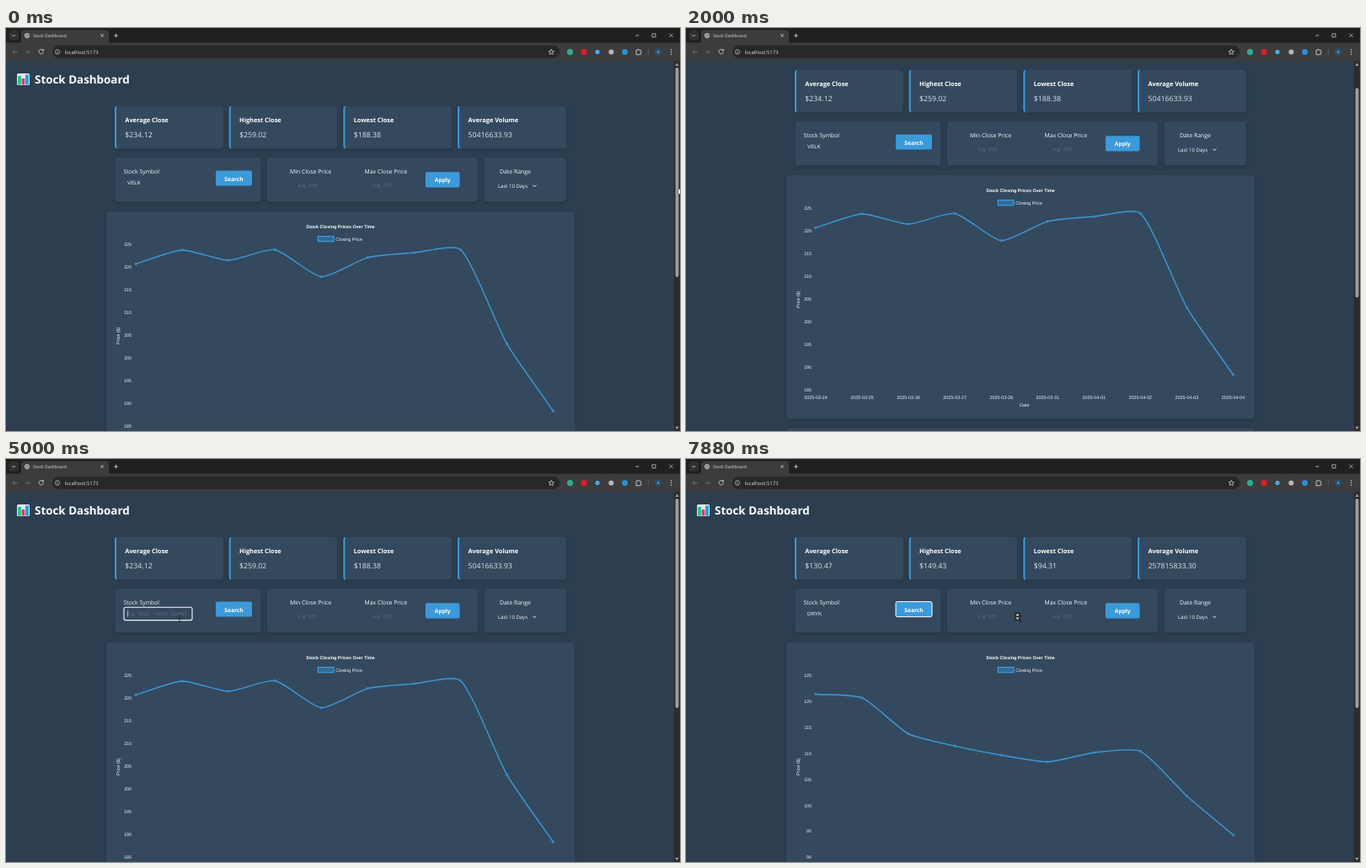
Animation, 800 px wide and 479 px high, one loop 8000 ms. Source, as an HTML page:

```html
<!DOCTYPE html>
<html lang="en">
<head>
<meta charset="utf-8">
<title>Stock Dashboard</title>
<style>
html, body { margin: 0; width: 100%; height: 100%; overflow: hidden; background: #2c3e50; }
svg { display: block; width: 100vw; height: 100vh; }
text { font-family: "Open Sans", "Noto Sans", sans-serif; text-rendering: geometricPrecision; white-space: pre; }
.plain { font-family: "Liberation Sans", Arial, sans-serif; }
.card { fill: #34495e; filter: drop-shadow(0 1px 1.5px rgba(0, 0, 0, .22)); }
</style>
</head>
<body>
<svg id="stage" viewBox="0 0 800 479" preserveAspectRatio="none"></svg>
<script>
const LOOP = 8000, STEP = 125;
const BLUE = '#3b9ad9', WHITE = '#f4f6f8', DIM = '#5d6e7e';
const stage = document.getElementById('stage');

function el(tag, attrs, parent, content) {
  const node = document.createElementNS('http://www.w3.org/2000/svg', tag);
  for (const key in attrs) node.setAttribute(key, attrs[key]);
  if (content !== undefined) node.textContent = content;
  parent.append(node);
  return node;
}
const group = (parent, attrs = {}) => el('g', attrs, parent);
const rect = (parent, x, y, width, height, attrs = {}) => el('rect', { x, y, width, height, ...attrs }, parent);
const circle = (parent, cx, cy, r, attrs) => el('circle', { cx, cy, r, ...attrs }, parent);
const line = (parent, d, attrs = {}) =>
  el('path', { d, fill: 'none', stroke: '#ddd', 'stroke-width': .8, ...attrs }, parent);
// cy is the middle of the capital letters
const text = (parent, x, cy, str, size, attrs = {}) =>
  el('text', { x, y: cy + size * .36, 'font-size': size, fill: WHITE, ...attrs }, parent, str);
const plain = (parent, x, cy, str, size, attrs) => text(parent, x, cy, str, size, { class: 'plain', ...attrs });
const middle = { 'text-anchor': 'middle' };
const show = (node, on) => node.setAttribute('visibility', on ? 'visible' : 'hidden');

const days = ['03-24', '03-25', '03-26', '03-27', '03-28', '03-31', '04-01', '04-02', '04-03', '04-04'].map(d => '2025-' + d);
const stocks = [
  { stats: ['$234.12', '$259.02', '$188.38', '50416633.93'], top: 225, ticks: 9,
    close: [220.73, 223.75, 221.53, 223.85, 217.9, 222.13, 223.19, 223.89, 203.19, 188.38] },
  { stats: ['$130.47', '$149.43', '$94.31', '257815833.30'], top: 125, ticks: 8,
    close: [121.41, 120.69, 113.76, 111.43, 109.67, 108.38, 110.15, 110.42, 101.8, 94.31] }
];
const AXIS = { left: 154, step: 55.05, top: 257.3, bottom: 473.4 };
const tickGap = s => (AXIS.bottom - AXIS.top) / (s.ticks - 1);
for (const s of stocks) s.ys = s.close.map(v => AXIS.top + (s.top - v) / 5 * tickGap(s));

/* ---------- page ---------- */
rect(stage, 0, 0, 800, 479, { fill: '#2c3e50' });
const page = group(stage);

rect(page, 13, 54, 15, 14, { rx: 1.5, fill: '#dfe9ef' });
rect(page, 14, 57, 4, 10.5, { fill: '#22c58b' });
rect(page, 18.7, 60, 3.6, 7.5, { fill: '#e8336d' });
rect(page, 23, 55.5, 4, 12, { fill: '#2b9fd8' });
text(page, 34, 61.3, 'Stock Dashboard', 13.4, { 'font-weight': 700, fill: '#fff' });

const card = (x, y, w, h) => rect(page, x, y, w, h, { rx: 4, class: 'card' });
const statValues = ['Average Close', 'Highest Close', 'Lowest Close', 'Average Volume'].map((label, i) => {
  const x = 129 + i * 135.7;
  card(x, 92.7, 128.8, 50.8);
  line(page, `M${x + 3} 92.7Q${x} 92.7 ${x} 96V140Q${x} 143.5 ${x + 3} 143.5Q${x + 2} 143 ${x + 2} 140V96Q${x + 2} 93.3 ${x + 3} 92.7Z`,
    { fill: BLUE, stroke: 'none' });
  text(page, x + 12.3, 109.8, label, 7.4, { 'font-weight': 700, fill: '#fff' });
  return text(page, x + 12.3, 126.4, '', 8.75, { fill: '#dde3e8' });
});

card(129.5, 154, 173, 52.6);
card(310, 154, 250, 52.6);
card(567.5, 154, 97.5, 52.6);
text(page, 139.5, 170.4, 'Stock Symbol', 6.85);
text(page, 337, 170.4, 'Min Close Price', 6.9);
text(page, 425.5, 170.4, 'Max Close Price', 6.9);
text(page, 586, 170.4, 'Date Range', 6.9);
plain(page, 347, 187.3, 'e.g. 100', 6.1, { fill: DIM });
plain(page, 435.5, 187.3, 'e.g. 200', 6.1, { fill: DIM });
text(page, 584, 187.5, 'Last 10 Days', 6);
line(page, 'M625.3 186.6l2 2 2-2', { stroke: WHITE, 'stroke-width': 1 });

const field = rect(page, 140, 176.2, 81, 15.4, { rx: 2, fill: '#34495e', stroke: WHITE, 'stroke-width': 1.1 });
const selection = rect(page, 143.5, 179.5, 17, 8, { fill: '#3f7fc4' });
const symbol = plain(page, 144, 183.7, '', 6.2);
const hint = plain(page, 144, 183.7, 'e.g. VELK, PWOZ, ZORBI', 6, { fill: DIM });
const caret = rect(page, 144, 180, .6, 7.5, { fill: WHITE });

const button = (x, y, w, h, label) => {
  const box = rect(page, x, y, w, h, { rx: 2, fill: BLUE });
  text(page, x + w / 2, y + h / 2 + .6, label, 6.65, { 'font-weight': 700, fill: '#fff', ...middle });
  return box;
};
const search = button(249, 169.6, 43, 18, 'Search');
button(498, 171.2, 40.5, 18.2, 'Apply');

const spinners = [393.5, 482.5].map(x => {
  const g = group(page);
  rect(g, x - 3.4, 182, 6.8, 10.5, { rx: 1, fill: '#2b2f33' });
  line(g, `M${x - 2} 186.2h4l-2-2.6zM${x - 2} 188.5h4l-2 2.6z`, { fill: '#ddd', stroke: 'none' });
  return g;
});

/* ---------- chart ---------- */
card(119, 218, 556.5, 289.5);
plain(page, 397, 235.6, 'Stock Closing Prices Over Time', 5.4, { 'font-weight': 700, fill: '#fff', ...middle });
rect(page, 370.4, 247.6, 18.6, 6, { fill: 'rgba(52,152,219,.4)', stroke: BLUE, 'stroke-width': 1.3 });
plain(page, 391.3, 250.6, 'Closing Price', 5.4);
plain(page, 0, 0, 'Price ($)', 5.4, { ...middle, transform: 'translate(133.3 365.8) rotate(-90)' });
plain(page, 401.7, 491.2, 'Date', 5.4, middle);
const pointX = days.map((day, i) => {
  const x = AXIS.left + i * AXIS.step;
  line(page, `M${x} ${AXIS.top}V${AXIS.bottom + 3}`, { stroke: 'rgba(0,0,0,.06)', 'stroke-width': .5 });
  plain(page, x, 481.6, day, 5.4, middle);
  return x;
});
const scales = stocks.map(s => {
  const g = group(page);
  for (let i = 0; i < s.ticks; i++) {
    const y = AXIS.top + i * tickGap(s);
    line(g, `M151 ${y}H649.5`, { stroke: 'rgba(0,0,0,.06)', 'stroke-width': .5 });
    plain(g, 149, y, s.top - i * 5, 5.3, { 'text-anchor': 'end' });
  }
  return g;
});
const curve = line(page, '', { stroke: BLUE, 'stroke-width': 1.4 });
const dots = pointX.map(x => circle(page, x, 0, 1.3, { fill: '#357fb4', stroke: BLUE, 'stroke-width': .6 }));

function spline(ys, tension = .2) {
  const pts = ys.map((y, i) => [pointX[i], y]);
  const handles = pts.map((p, i) => {
    const a = pts[i - 1] || p, b = pts[i + 1] || p;
    const da = Math.hypot(p[0] - a[0], p[1] - a[1]), db = Math.hypot(b[0] - p[0], b[1] - p[1]);
    const at = k => [p[0] + k * (b[0] - a[0]), p[1] + k * (b[1] - a[1])];
    return { before: at(-tension * da / (da + db)), after: at(tension * db / (da + db)) };
  });
  return pts.map((p, i) => i ? `C${handles[i - 1].after} ${handles[i].before} ${p}` : `M${p}`).join('');
}

/* ---------- table ---------- */
card(119, 518.5, 556.5, 270);
const columns = [134, 215.3, 296.6, 378, 459.3, 540.6];
['Date', 'Open', 'High', 'Low', 'Close', 'Volume'].forEach((name, i) =>
  text(page, columns[i], 540, name, 7, { fill: '#94a3ae' }));
const rows = [
  '221.00 221.02 218.58 42,364,298', '220.81 224.10 220.08 34,200,012',
  '223.51 225.02 220.47 34,466,100', '221.39 224.99 220.56 37,094,800',
  '221.67 223.81 217.68 39,818,600', '217.01 225.62 216.23 65,299,300',
  '219.81 223.68 218.90 36,412,700', '221.32 225.19 221.02 35,905,900',
  '205.54 207.49 201.25 103,419,000', '193.89 199.88 187.34 125,910,900'
];
rows.forEach((row, i) => {
  const y = 561.5 + i * 21.5, cells = row.split(' ');
  cells.unshift(days[i]);
  cells.splice(4, 0, stocks[0].close[i].toFixed(2));
  line(page, `M130 ${y - 10.8}H665`, { stroke: '#3d5166', 'stroke-width': .5 });
  cells.forEach((cell, c) => text(page, columns[c], y, cell, 6.95));
});

/* ---------- browser frame ---------- */
const bar = group(stage);
rect(bar, 793, 39, 7, 440, { fill: '#2c2c2c' });
line(bar, 'M794.4 45h4.2l-2.1-3.4zM794.4 473.8h4.2l-2.1 3.4z', { fill: '#a0a0a0', stroke: 'none' });
const thumb = rect(bar, 794.6, 47, 3.8, 249, { rx: 1.9, fill: '#9f9f9f' });

rect(bar, 0, 0, 800, 18, { fill: '#1f2020' });
rect(bar, 0, 17.5, 800, 21.7, { fill: '#3c3c3c' });
rect(bar, 3.5, 3, 11.5, 11.5, { rx: 3.5, fill: '#303131' });
line(bar, 'M7.2 8l2 2 2-2');
line(bar, 'M14.5 18Q18 18 18 14.5V6Q18 2.5 21.5 2.5H118.5Q122 2.5 122 6V14.5Q122 18 125.5 18Z', { fill: '#3c3c3c', stroke: 'none' });
circle(bar, 25, 9, 2.7, { fill: '#777', stroke: '#ccc', 'stroke-width': .8 });
line(bar, 'M23 8.2l2.2.6.3 2.4', { 'stroke-width': .6 });
text(bar, 32, 9.2, 'Stock Dashboard', 5.05, { fill: '#e3e3e3' });
line(bar, 'M112.5 7.2l3.4 3.4m0-3.4l-3.4 3.4M128 9h5M130.5 6.5v5');
line(bar, 'M747 9h4.4M767 6.8h4v4h-4zM787.5 6.8l4 4m0-4l-4 4', { 'stroke-width': .7 });

line(bar, 'M13.5 28.4H8m2.4-2.5L8 28.4l2.4 2.5M22.5 28.4H28m-2.4-2.5l2.4 2.5-2.4 2.5', { stroke: '#747474' });
line(bar, 'M44 26.6a2.7 2.7 0 1 0 .4 2.2M44.5 25.2v1.9h-1.9');
rect(bar, 55, 20.8, 602.5, 15, { rx: 7.5, fill: '#282828' });
circle(bar, 61, 28.4, 2.7, { fill: 'none', stroke: '#ccc', 'stroke-width': .7 });
line(bar, 'M61 28v1.8M61 26.7v.6', { 'stroke-width': .7 });
text(bar, 69.5, 28.5, 'localhost:5173', 5.95, { fill: '#e3e3e3' });
const star = Array.from({ length: 10 }, (_, i) => {
  const a = i * Math.PI / 5, r = i % 2 ? 1.5 : 3.4;
  return [647.3 + r * Math.sin(a), 28.6 - r * Math.cos(a)];
});
line(bar, `M${star.join('L')}Z`, { 'stroke-width': .7 });
[[669.5, 3.6, '#2fa98c'], [686, 3.6, '#d8202c'], [702, 2.6, '#4aa9e6'], [718.3, 3, '#b4b8ba'], [734.5, 3.4, '#2e8fd0']]
  .forEach(([x, r, fill]) => circle(bar, x, 28.4, r, { fill }));
line(bar, 'M748 26.2h1.5a1 1 0 0 1 2 0h1.7v1.7a1 1 0 0 1 0 2v1.8H748z');
line(bar, 'M762.5 24.5v8', { stroke: '#5f6468', 'stroke-width': .6 });
circle(bar, 774, 28.4, 4.6, { fill: '#294b66' });
text(bar, 774, 28.5, 'A', 5, { fill: '#b9d3e6', ...middle });
[25.8, 28.4, 31].forEach(y => circle(bar, 789.5, y, .7, { fill: '#ddd' }));

/* ---------- pointer ---------- */
const pointers = {
  arrow: line(stage, 'M0 0V8.6L2 6.8 3.3 9.8 4.6 9.2 3.3 6.3H6Z', { fill: '#fff', stroke: '#111', 'stroke-width': .5 }),
  beam: line(stage, 'M-1.5 -3.6h3M0 -3.6v7.2M-1.5 3.6h3', { stroke: '#15202a', 'stroke-width': .7 }),
  hand: line(stage, 'M-1 0Q-.2 -1.2 .6 0V2.8Q3.6 2.7 3.6 4.2V5.8L2.7 8H-.9L-3 4.6Q-2.4 3.6 -1 4.7Z',
    { fill: '#fff', stroke: '#111', 'stroke-width': .5 })
};

/* ---------- motion ---------- */
const scrollKeys = [[0, 0], [250, 0], [750, 104], [1250, 300], [1375, 300], [2000, 43], [2250, 0]];
const pointerKeys = [
  [0, 798, 190], [250, 801, 192], [2250, 801, 192], [2500, 720, 196], [2875, 470, 199], [3500, 190, 184],
  [4000, 144, 184], [4375, 206, 190], [6125, 206, 190], [6500, 262, 182], [6875, 262, 182], [7375, 330, 186], [7875, 397, 190]
];
const FOCUS = 3500, SELECT = 3875, CLEAR = 4500, CLICK = 6750, LOAD = 6875, MORPH = 1000;
const keyTimes = [5375, 5500, 5750, 5875];

function track(keys, t) {
  const i = keys.findIndex(k => k[0] > t);
  if (i < 0) return keys[keys.length - 1].slice(1);
  const [a, b] = [keys[i - 1], keys[i]], p = (t - a[0]) / (b[0] - a[0]);
  return a.slice(1).map((v, n) => v + (b[n + 1] - v) * p);
}
const inside = (x, y, l, t, r, b) => x >= l && x <= r && y >= t && y <= b;

function drawPointer(t) {
  const [x, y] = track(pointerKeys, t);
  const overMin = inside(x, y, 337, 177, 400, 201), overMax = inside(x, y, 425, 177, 488, 201);
  const overSymbol = inside(x, y, 140, 176, 221, 192);
  const overButton = inside(x, y, 249, 169, 292, 188);
  const kind = overButton ? 'hand' : overMin || overMax || overSymbol ? 'beam' : 'arrow';
  for (const name in pointers) {
    show(pointers[name], name === kind);
    pointers[name].setAttribute('transform', `translate(${x} ${y})`);
  }
  show(spinners[0], overMin);
  show(spinners[1], overMax);
}

function drawField(t) {
  const typed = 'DRYK'.slice(0, keyTimes.filter(k => t >= k).length);
  const focused = t >= FOCUS && t < CLICK;
  symbol.textContent = t < CLEAR ? 'VELK' : typed;
  show(field, focused);
  show(selection, t >= SELECT && t < CLEAR);
  show(hint, t >= CLEAR && !typed);
  show(caret, focused && t >= CLEAR && t < 6500 && t % 1000 < 500);
  caret.setAttribute('x', 144.3 + typed.length * 4.3);
  search.setAttribute('stroke', t >= CLICK ? '#fff' : 'none');
}

function drawChart(t) {
  const now = t >= LOAD ? 1 : 0;
  const p = Math.min(1, Math.max(0, (t - LOAD) / MORPH)), ease = 1 - (1 - p) ** 4;
  const ys = stocks[0].ys.map((y, i) => y + (stocks[1].ys[i] - y) * ease);
  scales.forEach((g, i) => show(g, i === now));
  statValues.forEach((node, i) => { node.textContent = stocks[now].stats[i]; });
  curve.setAttribute('d', spline(ys));
  dots.forEach((dot, i) => dot.setAttribute('cy', ys[i]));
}

function draw(t) {
  const [scroll] = track(scrollKeys, t);
  page.setAttribute('transform', `translate(0 ${-scroll})`);
  thumb.setAttribute('y', 47 + scroll * .5625);
  drawField(t);
  drawChart(t);
  drawPointer(t);
}

const start = performance.now();
function tick() {
  const t = (performance.now() - start) % LOOP;
  draw(Math.floor(t / STEP) * STEP);
  requestAnimationFrame(tick);
}
tick();
</script>
</body>
</html>
```
